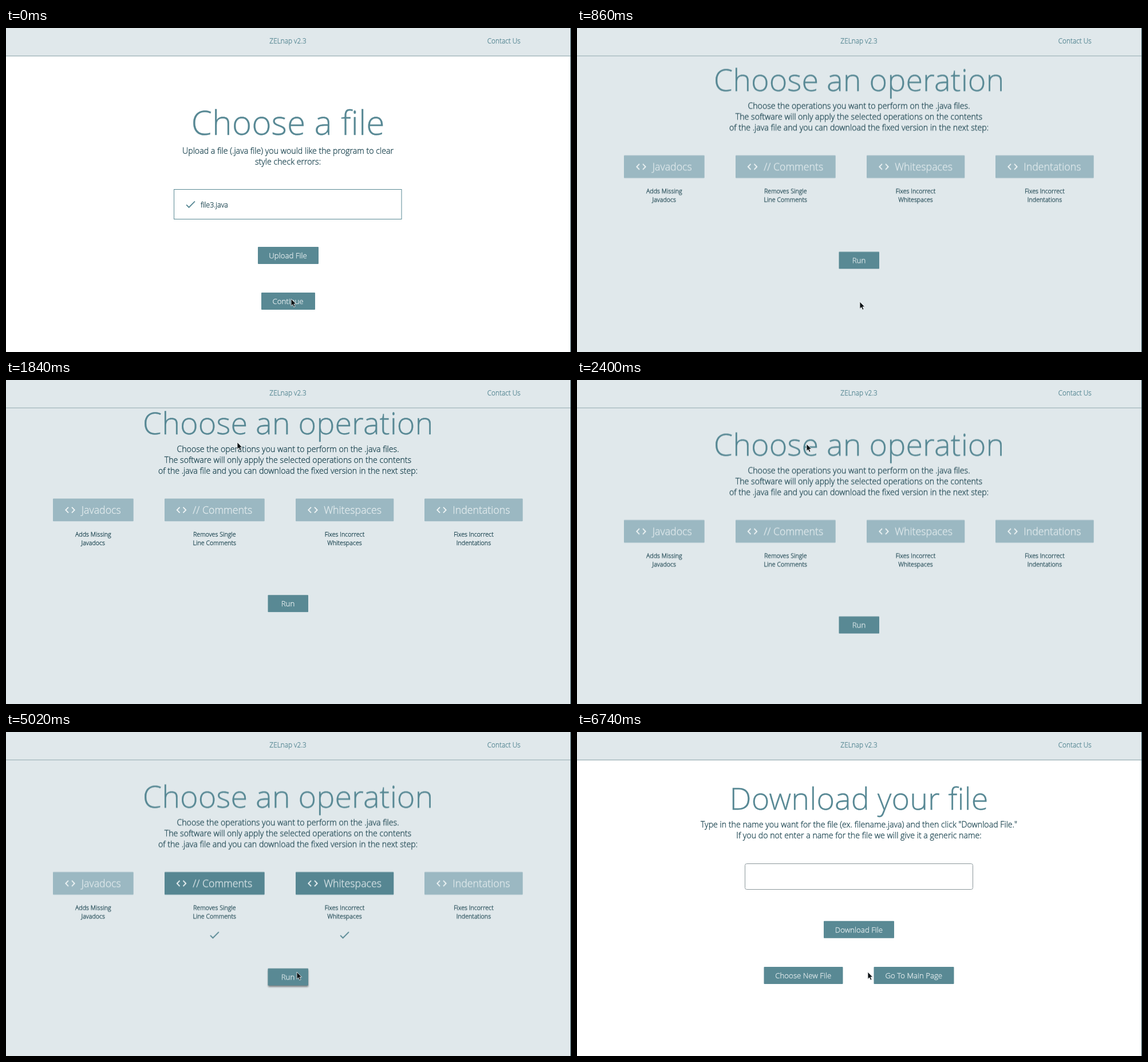
Recreate the animation shown at these times as an HTML page. Size 987 px wide and 567 px high, loop 6.76 s.

```html
<!DOCTYPE html>
<html lang="en">
<head>
<meta charset="utf-8">
<title>Style check fixer</title>
<style>
html, body { margin: 0; width: 100%; height: 100%; overflow: hidden; background: #fff; }
svg { display: block; width: 987px; height: 567px; }
text {
  font: 300 14.2px "Open Sans", sans-serif;
  color: #17414d;
  fill: currentColor;
  stroke: currentColor;
  stroke-width: .28px;
}
.mid { text-anchor: middle; }
.mid text { text-anchor: middle; }
.title { font-size: 54px; color: #578894; }
.title.big { font-size: 58.8px; }
.note text { font-size: 10.7px; }
.nav { font-size: 11.8px; color: #578894; }
.file { font-size: 12.45px; }
.btn rect { fill: #598994; }
.btn text { font-size: 13.25px; color: #e6eef0; }
.op rect { fill: #9bb8c2; }
.op text { font-size: 17.8px; color: #e6eef0; }
.op use { fill: #f0f5f6; }
.tick { fill: #578894; }
.shadow { filter: blur(1.4px); }

.pages, .cursor, .comments rect, .spaces rect, .tick1, .tick2, .shadow {
  animation: 6760ms linear infinite;
}
.pages { animation-name: scroll; }
.cursor { animation-name: point; animation-timing-function: ease-in-out; }
.comments rect { animation-name: comments; }
.spaces rect { animation-name: spaces; }
.tick1 { animation-name: tick1; animation-timing-function: step-end; }
.tick2 { animation-name: tick2; animation-timing-function: step-end; }
.shadow { animation-name: lift; }

@keyframes scroll {
  0% { transform: translateY(0); }
  4.763% { transform: translateY(0); animation-timing-function: cubic-bezier(.364, 0, .636, 1); }
  13.639% { transform: translateY(-601px); }
  27.367% { transform: translateY(-601px); animation-timing-function: cubic-bezier(.215, .61, .355, 1); }
  32.988% { transform: translateY(-563.5px); }
  88.455% { transform: translateY(-563.5px); animation-timing-function: step-end; }
  88.46% { transform: translateY(-671.5px); animation-timing-function: cubic-bezier(.33, .345, .6, 1); }
  94.94%, 100% { transform: translateY(-1202px); }
}
@keyframes point {
  0%, 4.7% { transform: translate(498px, 474px); }
  12.7%, 16.3% { transform: translate(494px, 479px); }
  25.5%, 27.2% { transform: translate(404px, 109px); }
  35.5%, 38.5% { transform: translate(401px, 112px); }
  44.4%, 47.3% { transform: translate(388px, 264px); }
  54.7%, 62.1% { transform: translate(583px, 264px); }
  72.5%, 100% { transform: translate(508px, 420px); }
}
@keyframes comments {
  0%, 43% { fill: #9bb8c2; }
  44.5%, 50% { fill: #7a959d; }
  51.5%, 100% { fill: #568692; }
}
@keyframes spaces {
  0%, 51.3% { fill: #9bb8c2; }
  52.8%, 65.5% { fill: #7a959d; }
  67%, 100% { fill: #568692; }
}
@keyframes tick1 { 0% { opacity: 0; } 45.9%, 100% { opacity: 1; } }
@keyframes tick2 { 0% { opacity: 0; } 55.9%, 100% { opacity: 1; } }
@keyframes lift { 0%, 71.6% { opacity: 0; } 73.5%, 100% { opacity: .45; } }
</style>
</head>
<body>
<svg viewBox="0 0 987 567">
  <defs>
    <path id="code" transform="scale(.9) translate(-2 -12)" d="M9.4 16.6L4.8 12l4.6-4.6L8 6l-6 6 6 6zm5.2 0l4.6-4.6-4.6-4.6L16 6l6 6-6 6z"/>
    <path id="tick" transform="scale(.92) translate(-12.2 -12.3)" d="M9 16.17L4.83 12l-1.42 1.41L9 19 21 7l-1.41-1.41z"/>
  </defs>

  <g class="pages">
    <g>
      <g class="mid">
        <text class="title big" x="492.5" y="187">Choose a file</text>
        <text x="492.5" y="219.5">Upload a file (.java file) you would like the program to clear</text>
        <text x="492.5" y="239">style check errors:</text>
      </g>
      <rect x="293.5" y="282.5" width="397.5" height="52" fill="#fff" stroke="#598994"/>
      <use class="tick" href="#tick" x="322.5" y="309"/>
      <text class="file" x="340" y="313.6">file3.java</text>
      <g class="btn mid">
        <rect x="440" y="383" width="106" height="30" rx="1"/>
        <text x="492.5" y="403.2">Upload File</text>
        <rect x="446" y="463" width="94" height="30" rx="1"/>
        <text x="492.5" y="483.2">Continue</text>
      </g>
    </g>

    <g transform="translate(0 563.5)">
      <rect y="37.5" width="987" height="601" fill="#e0e8eb"/>
      <g class="mid">
        <text class="title" x="492.5" y="132">Choose an operation</text>
        <text x="492.5" y="163">Choose the operations you want to perform on the .java files.</text>
        <text x="492.5" y="182.4">The software will only apply the selected operations on the contents</text>
        <text x="492.5" y="201.9">of the .java file and you can download the fixed version in the next step:</text>
      </g>
      <g class="op">
        <rect x="82" y="245" width="140.7" height="39.7" rx="1"/>
        <use href="#code" x="103" y="265"/>
        <text x="131.7" y="271.5">Javadocs</text>
      </g>
      <g class="op comments">
        <rect x="277" y="245" width="174.7" height="39.7" rx="1"/>
        <use href="#code" x="297.5" y="265"/>
        <text x="326.2" y="271.5">// Comments</text>
      </g>
      <g class="op spaces">
        <rect x="506" y="245" width="171.3" height="39.7" rx="1"/>
        <use href="#code" x="527" y="265"/>
        <text x="555.2" y="271.5">Whitespaces</text>
      </g>
      <g class="op">
        <rect x="731" y="245" width="171.7" height="39.7" rx="1"/>
        <use href="#code" x="752" y="265"/>
        <text x="780.2" y="271.5">Indentations</text>
      </g>
      <g class="note mid">
        <text x="152.3" y="311.4">Adds Missing</text>
        <text x="152.3" y="326.4">Javadocs</text>
        <text x="364.3" y="311.4">Removes Single</text>
        <text x="364.3" y="326.4">Line Comments</text>
        <text x="591.5" y="311.4">Fixes Incorrect</text>
        <text x="591.5" y="326.4">Whitespaces</text>
        <text x="817" y="311.4">Fixes Incorrect</text>
        <text x="817" y="326.4">Indentations</text>
      </g>
      <use class="tick tick1" href="#tick" x="364.3" y="355.5"/>
      <use class="tick tick2" href="#tick" x="591.5" y="355.5"/>
      <rect class="shadow" x="458" y="416" width="70" height="30" rx="1"/>
      <g class="btn mid">
        <rect x="457.5" y="413.7" width="70.5" height="30" rx="1"/>
        <text x="492.5" y="433.8">Run</text>
      </g>
    </g>

    <g transform="translate(0 1202)">
      <g class="mid">
        <text class="title" x="492.5" y="136">Download your file</text>
        <text x="492.5" y="166.8">Type in the name you want for the file (ex. filename.java) and then click "Download File."</text>
        <text x="492.5" y="186.3">If you do not enter a name for the file we will give it a generic name:</text>
      </g>
      <rect x="293.5" y="230.5" width="398" height="45" rx="3" fill="#fff" stroke="#8b979b"/>
      <g class="btn mid">
        <rect x="431" y="330.7" width="123" height="30" rx="1"/>
        <text x="492.5" y="350.8">Download File</text>
        <rect x="326.5" y="411" width="138" height="30" rx="1"/>
        <text x="395.3" y="431.2">Choose New File</text>
        <rect x="518.5" y="411" width="140" height="30" rx="1"/>
        <text x="588.3" y="431.2">Go To Main Page</text>
      </g>
    </g>
  </g>

  <g>
    <rect width="987" height="48" fill="#e0e8eb"/>
    <rect y="48" width="987" height="1" fill="#afc0c5"/>
    <rect y="49" width="987" height="1" fill="#c3d0d4"/>
    <text class="nav mid" x="492.5" y="27">ZELnap v2.3</text>
    <text class="nav" x="840.8" y="27">Contact Us</text>
  </g>
  <rect x="986" width="1" height="567" fill="#24454f"/>
  <path class="cursor" d="M0 0V12.4L2.8 9.8 4.8 14.3 7 13.3 5 8.9H8.7Z" fill="#0b1114" stroke="#f4f7f8" stroke-width=".8"/>
</svg>
</body>
</html>
```
